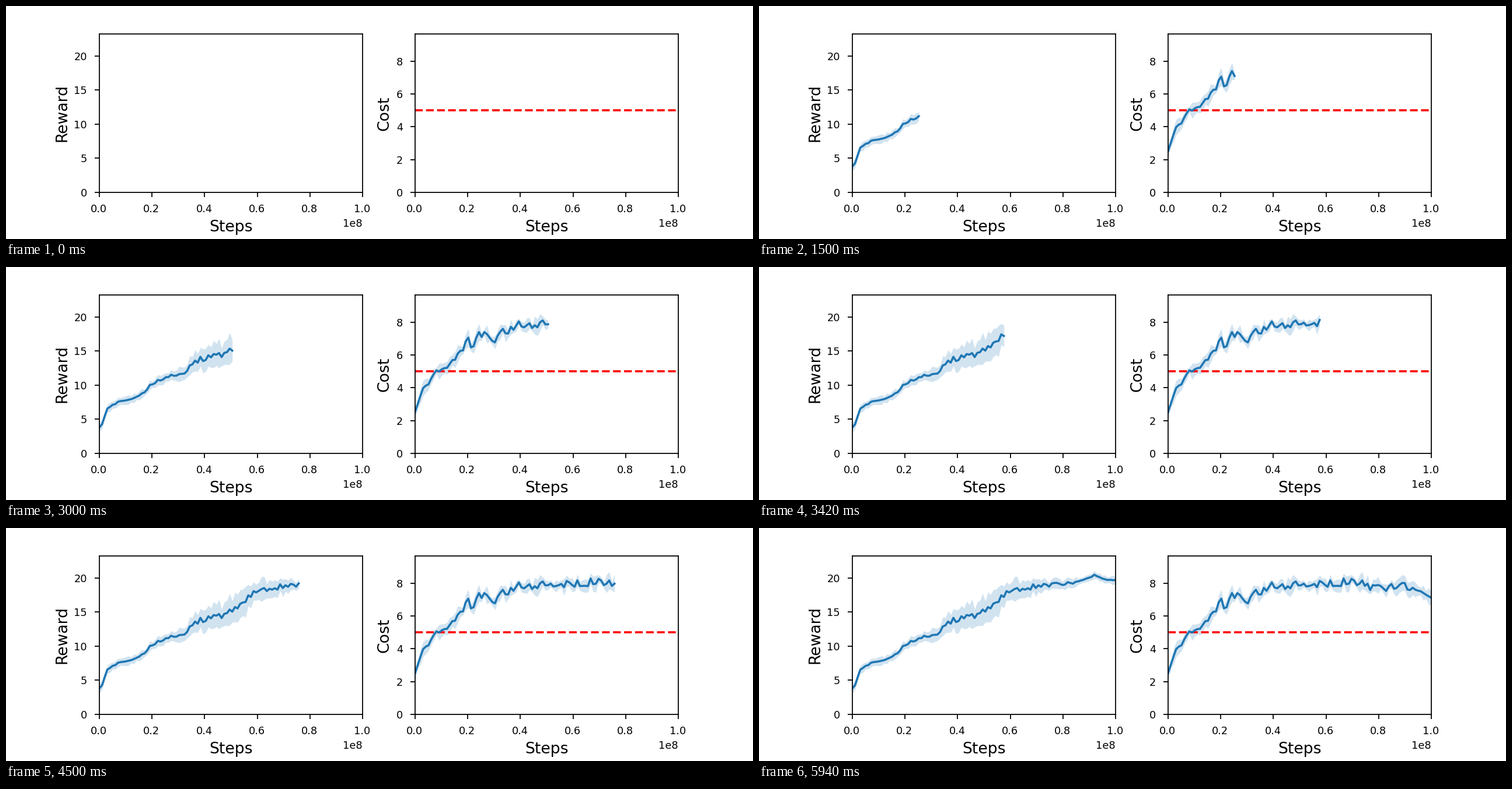
Write a matplotlib script that moves like this. It is 1280 px wide and 400 px high and loops after 6 s.

```python
import matplotlib.pyplot as plt
import numpy as np
from matplotlib.animation import FuncAnimation
from matplotlib.transforms import ScaledTranslation

plt.rcParams.update({
    "font.family": "DejaVu Sans",
    "font.size": 8,
    "axes.labelsize": 12,
    "xtick.major.pad": 5.6,
    "ytick.major.pad": 5.9,
})

POINTS = 100
MAX_STEPS = 1e8
LINE_WIDTH = 1.6

t = np.linspace(0, 1, POINTS)
steps = t * MAX_STEPS
rng = np.random.default_rng(7)


def noisy_trend(keys, jitter):
    """Join (percent, value) key points and add seeded jitter."""
    percent, value = zip(*keys)
    return np.interp(t * 100, percent, value) + jitter * rng.uniform(-1, 1, POINTS)


reward_mean = noisy_trend(
    [(0, 3.8), (1, 4.2), (3, 6.6), (7, 7.5), (13, 8.1), (17, 8.75),
     (20, 10.2), (24, 11.1), (29, 11.3), (34, 12.5), (36, 13.7),
     (42, 14.0), (50, 15.0), (53, 16.2), (57, 17.2), (62, 18.3),
     (71, 18.8), (85, 19.3), (92, 20.4), (96, 19.75), (100, 19.7)],
    0.06 + 0.5 * np.sin(np.pi * t) ** 2)
reward_spread = ((0.6 + 1.4 * np.exp(-((t - 0.51) / 0.18) ** 2))
                 * rng.uniform(0.65, 1.2, POINTS))

cost_mean = noisy_trend(
    [(0, 2.53), (3, 4.0), (5, 4.25), (8, 5.0), (13, 5.4), (17, 6.1),
     (20, 6.95), (22, 6.4), (24, 7.35), (27, 7.3), (29, 6.65),
     (34, 7.5), (39, 7.8), (50, 7.95), (71, 8.1), (79, 7.7),
     (89, 7.9), (95, 7.5), (100, 7.12)],
    0.28 * np.clip(4 * t, 0, 1) * np.clip(8 * (1 - t), 0, 1))
cost_spread = 0.37 * rng.uniform(0.45, 1.5, POINTS)


class Curve:
    """A mean line with a shaded band that grows point by point."""

    def __init__(self, ax, mean, spread):
        self.mean, self.low, self.high = mean, mean - spread, mean + spread
        self.line, = ax.plot([], [], color="C0", lw=LINE_WIDTH)
        self.band = ax.fill_between(steps[:1], self.low[:1], self.high[:1],
                                    color="C0", alpha=0.2, lw=0)

    def show(self, count):
        x = steps[:count]
        self.line.set_data(x, self.mean[:count])
        outline = np.column_stack([
            np.concatenate([x, x[::-1]]),
            np.concatenate([self.low[:count], self.high[:count][::-1]]),
        ])
        self.band.set_verts([outline])
        return self.band, self.line


def style_axes(ax, label, top, tick_step):
    ax.set(xlim=(0, MAX_STEPS), ylim=(0, top),
           xticks=np.linspace(0, MAX_STEPS, 6),
           yticks=np.arange(0, top, tick_step))
    ax.set_xlabel("Steps", x=0.499)
    ax.set_ylabel(label, labelpad=3.3)
    nudge = ScaledTranslation(-0.4 / 72, 0, ax.figure.dpi_scale_trans)
    for tick_label in ax.get_xticklabels():
        tick_label.set_transform(tick_label.get_transform() + nudge)


fig, (reward_ax, cost_ax) = plt.subplots(1, 2, figsize=(8, 2.5), dpi=160)
fig.subplots_adjust(left=0.125, right=0.9, bottom=0.2, top=0.88, wspace=0.2)

style_axes(reward_ax, "Reward", 23.2, 5)
style_axes(cost_ax, "Cost", 9.67, 2)
cost_ax.axhline(5, color="red", ls="--", lw=LINE_WIDTH)

curves = [Curve(reward_ax, reward_mean, reward_spread),
          Curve(cost_ax, cost_mean, cost_spread)]


def update(frame):
    return [artist for curve in curves for artist in curve.show(frame + 1)]


anim = FuncAnimation(fig, update, frames=POINTS, interval=60, repeat=True)
plt.show()
```
